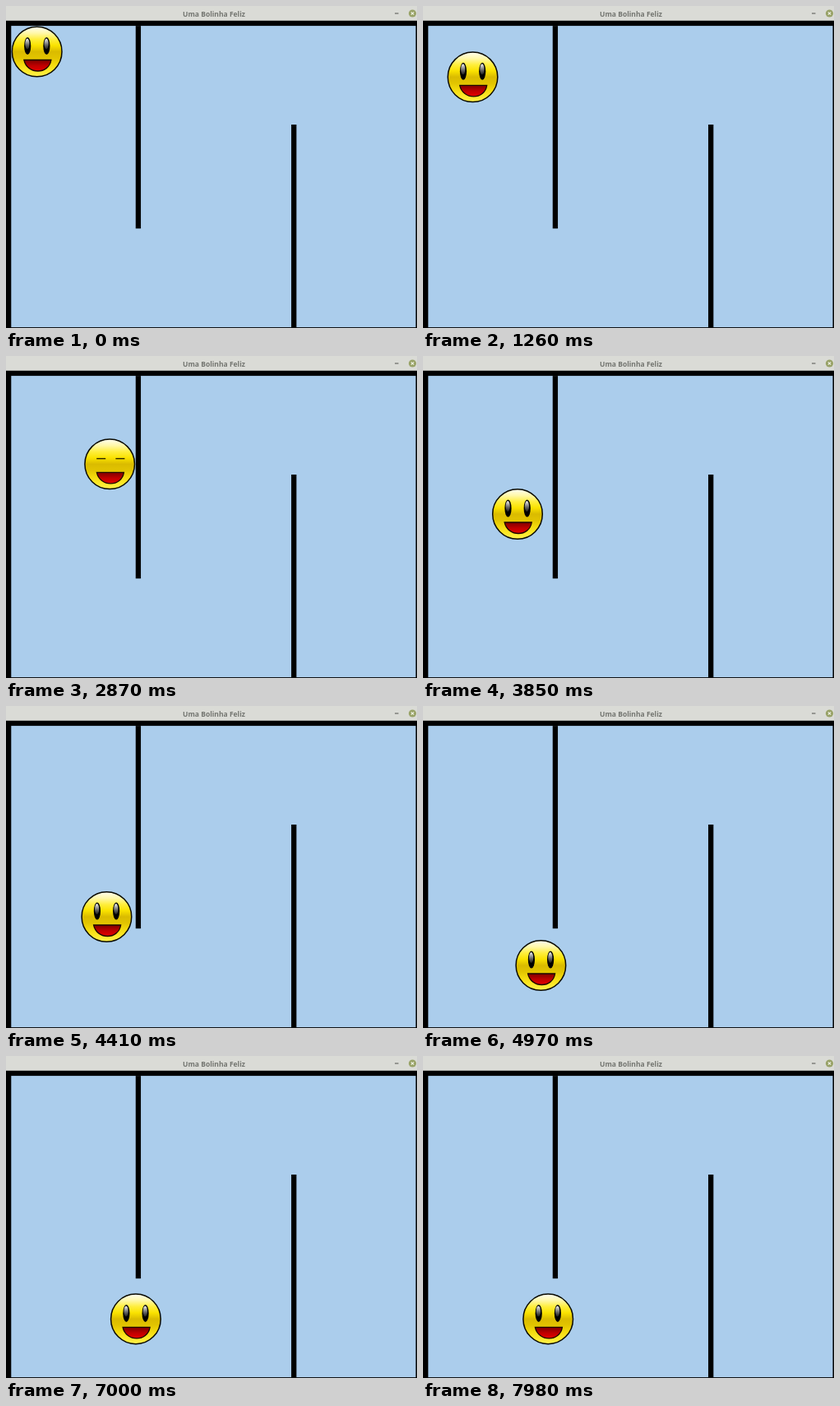
An HTML page with a canvas for the animation above (8 s loop, 500x391 px).

```html
<!DOCTYPE html>
<html lang="pt">
<head>
<meta charset="utf-8">
<title>Uma Bolinha Feliz</title>
<style>
  html, body { margin: 0; width: 100%; height: 100%; overflow: hidden; }
  canvas { display: block; }
</style>
</head>
<body>
<canvas id="stage" width="500" height="391"></canvas>
<script>
const ctx = document.getElementById('stage').getContext('2d');
const LOOP = 8000, STEP = 70;
const BAR = 17.8, SCALE = 0.631; // title bar height, game units to stage pixels
const WALL = 10;

// The player steers from stop to stop; two equal places make a pause.
const stops = [
  { t: 350, x: 37.7, y: 55.5 },
  { t: 1260, x: 60.5, y: 86.3 },
  { t: 2170, x: 126.2, y: 131.3 },
  { t: 3150, x: 126.2, y: 131.3 },
  { t: 3850, x: 115, y: 192 },
  { t: 4830, x: 128, y: 304 },
  { t: 4970, x: 143.4, y: 315 },
  { t: 6020, x: 196, y: 264 },
  { t: 6650, x: 165, y: 319.4 },
  { t: 7280, x: 152.2, y: 319.4 }
];

function position(t) {
  const i = stops.findIndex(s => s.t > t);
  if (i === 0) return stops[0];
  if (i < 0) return stops[stops.length - 1];
  const a = stops[i - 1], b = stops[i];
  const k = (t - a.t) / (b.t - a.t);
  return { x: a.x + (b.x - a.x) * k, y: a.y + (b.y - a.y) * k };
}

// Vertical gradient with evenly spaced colours
function gradient(top, bottom, ...colors) {
  const g = ctx.createLinearGradient(0, top, 0, bottom);
  colors.forEach((c, i) => g.addColorStop(i / (colors.length - 1), c));
  return g;
}

const skin = gradient(-30, 30, '#fffef0', '#fff8a8', '#ffee3c', '#fae200',
  '#dabb00', '#e2c400', '#f3d90c', '#fde826', '#fff04a');
const mouthFill = gradient(10, 24, '#7d0000', '#c00000', '#e80000');
const shine = gradient(-9, 6, '#f4f4f4', '#6a6a6a', '#000');

function rect(x, y, w, h, color) {
  ctx.fillStyle = color;
  ctx.fillRect(x, y, w, h);
}

function ellipse(x, y, rx, ry, fill) {
  ctx.beginPath();
  ctx.ellipse(x, y, rx, ry, 0, 0, Math.PI * 2);
  ctx.fillStyle = fill;
  ctx.fill();
}

function outline(color, width) {
  ctx.strokeStyle = color;
  ctx.lineWidth = width;
  ctx.stroke();
}

function line(x0, y0, x1, y1, color, width) {
  ctx.beginPath();
  ctx.moveTo(x0, y0);
  ctx.lineTo(x1, y1);
  outline(color, width);
}

function eye(x, closed) {
  if (closed) {
    line(x - 4.5, -6.7, x + 6.5, -6.7, '#2a2600', 1.4);
    return;
  }
  ctx.save();
  ctx.translate(x, -7);
  ellipse(0, 0, 4.1, 10.5, '#000');
  ellipse(-0.3, -2.5, 2.6, 6.5, shine);
  ctx.restore();
}

function face({ x, y }, closed) {
  ctx.save();
  ctx.translate(x, y);
  ellipse(0, 0, 30.3, 30.3, skin);
  outline('#0a0a00', 1.5);
  eye(-11.5, closed);
  eye(11.7, closed);

  ctx.beginPath();
  ctx.moveTo(-15.8, 10);
  ctx.lineTo(17.2, 10);
  ctx.bezierCurveTo(14.5, 28, -12, 28, -15.8, 10);
  ctx.closePath();
  ctx.fillStyle = mouthFill;
  ctx.fill();
  outline('#1c0500', 1.3);
  ctx.restore();
}

function titleBar() {
  rect(0, 0, 500, BAR, '#dadbd6');
  ctx.font = 'bold 8.5px "Noto Sans", sans-serif';
  ctx.textAlign = 'center';
  ctx.fillStyle = '#737570';
  ctx.fillText('Uma Bolinha Feliz', 253, 12.5);
  line(473, 9, 477.5, 9, '#686a65', 1.2);
  ellipse(494.5, 9, 4.6, 4.6, '#98a267');
  for (const d of [-1.7, 1.7]) line(494.5 - d, 7.3, 494.5 + d, 10.7, '#f2f4e8', 1.1);
}

function room() {
  ctx.save();
  ctx.translate(0, BAR);
  ctx.scale(SCALE, SCALE);
  rect(WALL, WALL, 780, 580, '#abcdec');
  rect(250, WALL, WALL, 390, '#000');
  rect(550, 200, WALL, 390, '#000');
  ctx.restore();
}

function draw(t) {
  rect(0, 0, 500, 391, '#000');
  room();
  titleBar();
  face(position(t), t >= 2870 && t < 3010);
}

const start = performance.now();
function tick() {
  const t = (performance.now() - start) % LOOP;
  draw(Math.floor(t / STEP) * STEP);
  requestAnimationFrame(tick);
}
tick();
</script>
</body>
</html>
```
